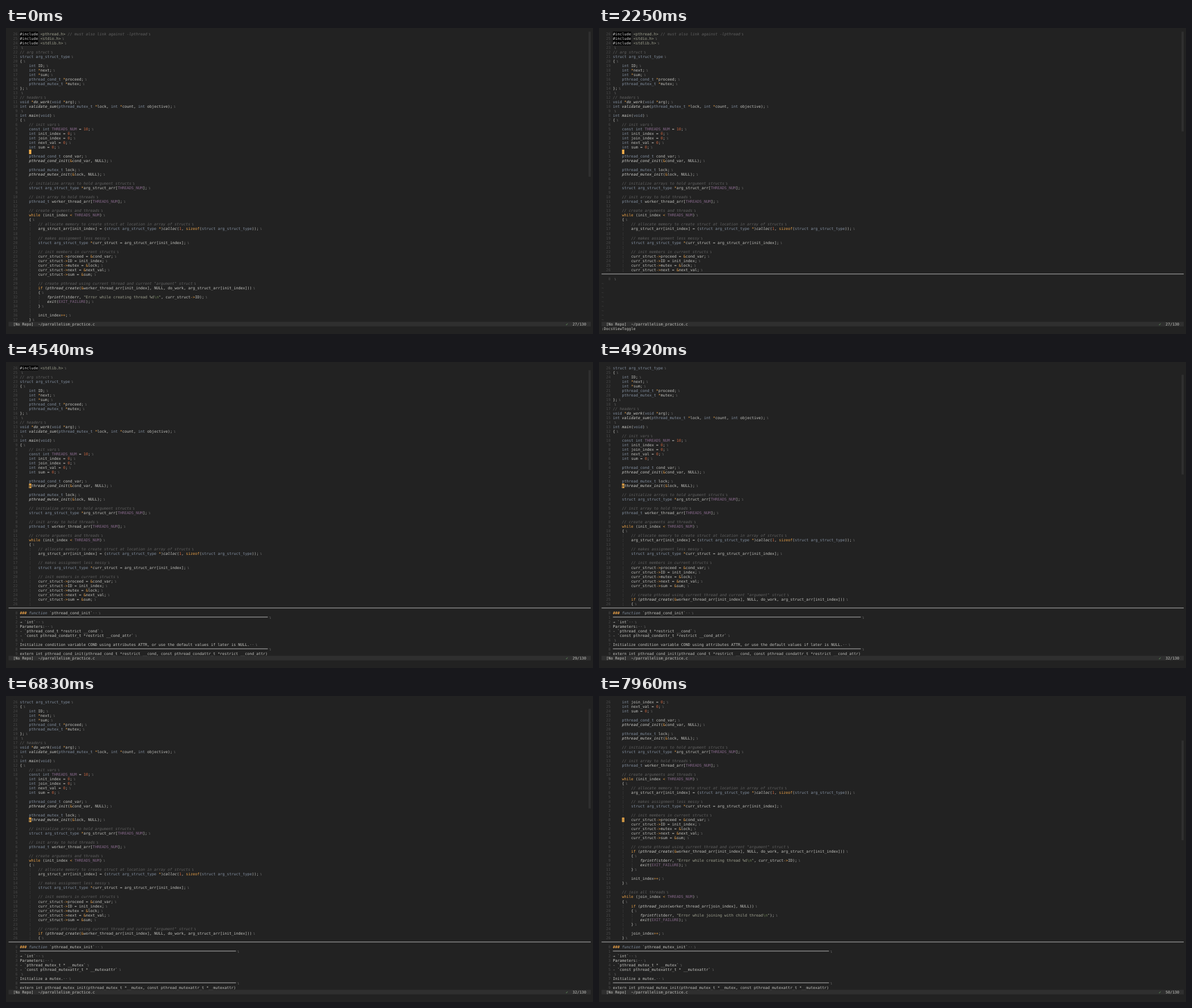
Recreate the animation shown at these times as an HTML page with a canvas. Size 1035 by 541 pixels, loop 8000 ms.

```html
<!DOCTYPE html>
<html lang="en">
<head>
<meta charset="utf-8">
<title>Editor with documentation split</title>
<style>
html, body { margin: 0; width: 100%; height: 100%; overflow: hidden; background: #222; }
canvas { display: block; }
</style>
</head>
<body>
<canvas id="stage" width="1035" height="541"></canvas>
<script>
const ctx = document.getElementById('stage').getContext('2d');

const LOOP = 8000, TOTAL = 130;
const LEFT = 4.5, TOP = 6.5, CW = 4.01, CH = 8.016, COLS = 256;
const GUTTER = 5, SPLIT_ROW = 53, STATUS_ROW = 64, CURSOR_ROW = 26;
const FONT = '6.66px "DejaVu Sans Mono", monospace';
const FG = '#c6c6c2', DIM = '#484848', EOL = '#6a6a6a', BG = '#222222',
      BAR = '#2f2f2f', RULE = '#c8c8c8', CURSOR = '#f5b04c', ORANGE = '#e8a048', TYPE = '#8592a3';

const SOURCE = String.raw`#include <pthread.h> // must also link against -lpthread
#include <stdio.h>
#include <stdlib.h>

// arg struct
struct arg_struct_type
{
    int ID;
    int *next;
    int *sum;
    pthread_cond_t *proceed;
    pthread_mutex_t *mutex;
};

// headers
void *do_work(void *arg);
int validate_sum(pthread_mutex_t *lock, int *count, int objective);

int main(void)
{
    // init vars
    const int THREADS_NUM = 10;
    int init_index = 0;
    int join_index = 0;
    int next_val = 0;
    int sum = 0;

    pthread_cond_t cond_var;
    pthread_cond_init(&cond_var, NULL);

    pthread_mutex_t lock;
    pthread_mutex_init(&lock, NULL);

    // initialize arrays to hold argument structs
    struct arg_struct_type *arg_struct_arr[THREADS_NUM];

    // init array to hold threads
    pthread_t worker_thread_arr[THREADS_NUM];

    // create arguments and threads
    while (init_index < THREADS_NUM)
    {
        // allocate memory to create struct at location in array of structs
        arg_struct_arr[init_index] = (struct arg_struct_type *)calloc(1, sizeof(struct arg_struct_type));

        // makes assignment less messy
        struct arg_struct_type *curr_struct = arg_struct_arr[init_index];

        // init members in current structs
        curr_struct->proceed = &cond_var;
        curr_struct->ID = init_index;
        curr_struct->mutex = &lock;
        curr_struct->next = &next_val;
        curr_struct->sum = &sum;

        // create pthread using current thread and current "argument" struct
        if (pthread_create(&worker_thread_arr[init_index], NULL, do_work, arg_struct_arr[init_index]))
        {
            fprintf(stderr, "Error while creating thread %d\n", curr_struct->ID);
            exit(EXIT_FAILURE);
        }

        init_index++;
    }

    // join all threads
    while (join_index < THREADS_NUM)
    {
        if (pthread_join(worker_thread_arr[join_index], NULL))
        {
            fprintf(stderr, "Error while joining with child thread\n");
            exit(EXIT_FAILURE);
        }

        join_index++;
    }`.split('\n');

// Each rule: pattern, colour, font style.
const RULES = [
  [/\/\/.*/, '#626262', 'italic'],
  [/#include/, '#d8d8d8', ''],
  [/<\w+\.h>|"\w[^"\\]*|"/, '#a4a694', ''],
  [/\\n/, '#708858', ''],
  [/\b(?:while|if|sizeof)\b/, ORANGE, ''],
  [/\b(?:struct|int|void|const|arg_struct_type|pthread_(?:\w+_)?t)\b/, TYPE, ''],
  [/THREADS_NUM|EXIT_FAILURE/, '#86688a', ''],
  [/\w+(?=\()/, '#d2d2ce', 'italic'],
  [/\b\d+\b/, '#c9643f', ''],
  [/->|\+\+|[*&<]/, ORANGE, ''],
  [/\w+|\S/, FG, '']
];
const LEXER = new RegExp(RULES.map(([re]) => `(${re.source})`).join('|'), 'g');

const indentOf = line => line.search(/\S/);
const CODE = SOURCE.map((line, i) => {
  const tokens = [...line.matchAll(LEXER)].map(m => {
    const [, color, style] = RULES[m.slice(1).findIndex(g => g !== undefined)];
    return { col: m.index, text: m[0], color, style };
  });
  const indent = indentOf(SOURCE.slice(i).find(l => l));
  return { line, tokens, indent };
});

function makeDoc(name, params, summary, signature) {
  const rule = '─'.repeat(signature.length);
  return ['### function `' + name + '`··', rule, '→ `int`··', 'Parameters:··',
    ...params.map(p => '- `' + p + '`'), '', summary + '··', rule, signature];
}
const DOCS = [
  [''],
  makeDoc('pthread_cond_init',
    ['pthread_cond_t *restrict __cond', 'const pthread_condattr_t *restrict __cond_attr'],
    'Initialize condition variable COND using attributes ATTR, or use the default values if later is NULL.',
    'extern int pthread_cond_init(pthread_cond_t *restrict __cond, const pthread_condattr_t *restrict __cond_attr)'),
  makeDoc('pthread_mutex_init',
    ['pthread_mutex_t * __mutex', 'const pthread_mutexattr_t * __mutexattr'],
    'Initialize a mutex.',
    'extern int pthread_mutex_init(pthread_mutex_t *__mutex, const pthread_mutexattr_t *__mutexattr)')
];

// Cursor blink toggles, starting visible.
const BLINK = [170, 540, 710, 1580, 1920, 2250, 3210, 3580, 3960, 4290,
  5250, 5630, 6040, 6420, 6750, 6830, 7750, 7960];
const LINE_AT = [[0, 27], [2830, 29], [4920, 32], [7380, 50]];
const DOC_AT = [[0, -1], [1580, 0], [3500, 1], [5580, 2]];
const COMMAND_AT = [[0, ''], [710, ':'], [1580, ':DocsViewToggle'], [4540, '']];
const valueAt = (steps, t) => steps.filter(s => s[0] <= t).pop()[1];

const colX = col => LEFT + col * CW;
const rowY = row => TOP + row * CH;

function put(text, col, row, color = FG, style = '') {
  ctx.font = `${style} ${FONT}`;
  ctx.fillStyle = color;
  ctx.fillText(text, colX(col), rowY(row) + 6.3);
}
function block(col, row, cols, rows, color) {
  ctx.fillStyle = color;
  ctx.fillRect(colX(col), rowY(row), cols * CW, rows * CH);
}
function hline(col, row, cols) {
  ctx.fillStyle = RULE;
  ctx.fillRect(colX(col), rowY(row) + CH / 2 - 0.9, cols * CW, 0.9);
}
function eol(col, row) {
  ctx.textAlign = 'center';
  put('↴', col + 1, row, EOL);
  ctx.textAlign = 'left';
}
const lineNumber = (n, row) => put(String(n).padStart(2), 2, row, DIM);

function drawCodeLine({ line, tokens, indent }, row) {
  for (let col = 4; col < indent; col += 4) put('¦', GUTTER + col, row, DIM);
  if (line.startsWith('#')) block(GUTTER, row, 8, 1, '#000');
  for (const t of tokens) put(t.text, GUTTER + t.col, row, t.color, t.style);
  if (line || !indent) eol(GUTTER + line.length, row);
}

function drawDocLine(text, row, last) {
  const body = text.replace('··', '');
  if (text.startsWith('#')) {
    put('###', GUTTER, row, ORANGE, 'bold');
    put('function', GUTTER + 4, row, TYPE, 'italic');
    put(body.slice(13), GUTTER + 13, row);
  } else if (text.startsWith('─')) {
    hline(GUTTER, row, text.length);
  } else {
    put(body, GUTTER, row);
  }
  if (body !== text) put('··', GUTTER + body.length, row, '#858585');
  if (!last) eol(GUTTER + text.length, row);
}

function drawDocs(lines) {
  hline(0, SPLIT_ROW, COLS);
  for (let i = 0; i < 10; i++) {
    const row = SPLIT_ROW + 1 + i;
    if (i < lines.length) {
      lineNumber(i, row);
      drawDocLine(lines[i], row, i === 9);
    } else {
      put('~', 0, row, DIM);
    }
  }
}

function drawCursor(line) {
  const col = GUTTER + 4;
  block(col, CURSOR_ROW, 1, 1, CURSOR);
  const { line: text, indent } = CODE[line - 1];
  if (text) put(indent > 4 ? '¦' : text[4], col, CURSOR_ROW, BG);
}

function draw(t) {
  const current = valueAt(LINE_AT, t), doc = valueAt(DOC_AT, t), command = valueAt(COMMAND_AT, t);
  const rows = doc < 0 ? STATUS_ROW : SPLIT_ROW;
  const offset = current - CURSOR_ROW - 1;

  ctx.fillStyle = BG;
  ctx.fillRect(0, 0, 1035, 541);
  for (let row = 0; row < rows; row++) {
    lineNumber(Math.abs(row - CURSOR_ROW), row);
    drawCodeLine(CODE[offset + row], row);
  }
  block(COLS - 1, Math.round(offset * rows / TOTAL), 1, Math.round(rows * rows / TOTAL), BAR);
  if (doc >= 0) drawDocs(DOCS[doc]);

  block(0, STATUS_ROW, COLS, 1, BAR);
  put('[No Repo]', 2, STATUS_ROW);
  put('~/parrallelism_practice.c', 13, STATUS_ROW);
  put('✓', 245, STATUS_ROW, '#6fae6a');
  put(`${current}/${TOTAL}`, 248, STATUS_ROW);

  put(command, 0, STATUS_ROW + 1);
  if (command === ':') block(1, STATUS_ROW + 1, 1, 1, CURSOR);
  if (BLINK.filter(b => b <= t).length % 2 === 0) drawCursor(current);
}

ctx.textRendering = 'geometricPrecision';
const start = performance.now();
function tick() {
  draw((performance.now() - start) % LOOP);
  requestAnimationFrame(tick);
}
tick();
</script>
</body>
</html>
```
